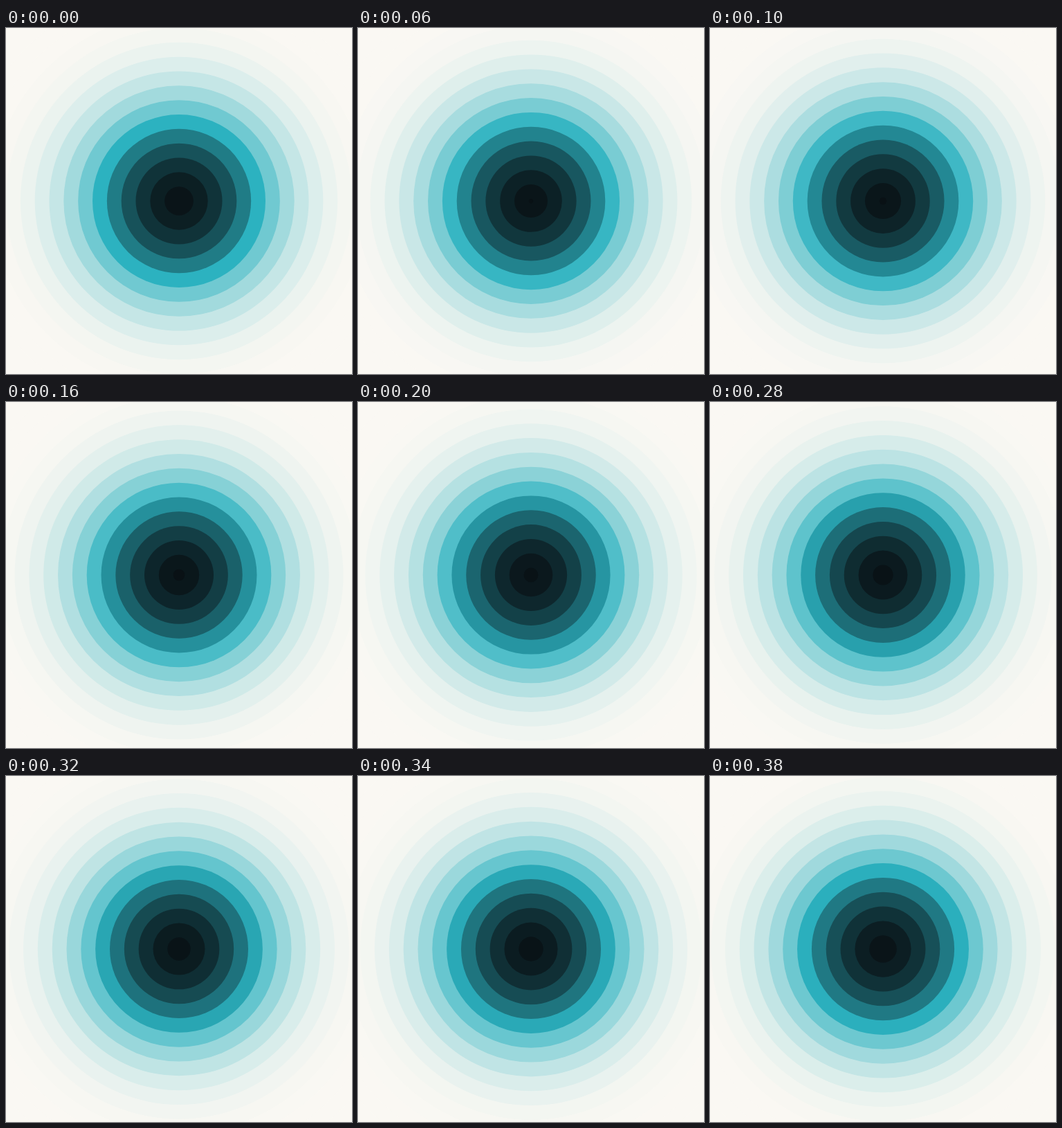
Recreate the animation shown at these times as an HTML page with a canvas. Size 500 by 500 pixels, loop 400 ms.

```html
<!DOCTYPE html>
<html lang="en">
<head>
<meta charset="utf-8">
<title>Expanding rings</title>
<style>
  html, body { margin: 0; height: 100%; overflow: hidden; background: #faf8f3; }
  canvas { display: block; }
</style>
</head>
<body>
<canvas id="stage" width="500" height="500"></canvas>
<script>
const ctx = document.getElementById('stage').getContext('2d');
const LOOP = 400, STEP = 20, CENTER = 250, SPACING = 250 / 12;
const RINGS = 16, TEAL_RING = 6;
const DARK = [9, 17, 21], TEAL = [44, 178, 192], PAPER = [250, 248, 243];

function mix(a, b, t) {
  return `rgb(${a.map((v, i) => Math.round(v + (b[i] - v) * t)).join()})`;
}

// Dark centre eases into teal, then teal fades out into the paper.
function ringColor(level) {
  return level < TEAL_RING
    ? mix(DARK, TEAL, (level / TEAL_RING) ** 2.25)
    : mix(PAPER, TEAL, ((RINGS - level) / (RINGS - TEAL_RING)) ** 3.8);
}

function draw(progress) {
  ctx.fillStyle = mix(PAPER, PAPER, 0);
  ctx.fillRect(0, 0, 500, 500);
  for (let i = RINGS - 1; i >= 0; i--) {
    const level = i + progress;
    ctx.fillStyle = ringColor(level);
    ctx.beginPath();
    ctx.arc(CENTER, CENTER, level * SPACING, 0, Math.PI * 2);
    ctx.fill();
  }
}

const start = performance.now();
function tick() {
  const time = (performance.now() - start) % LOOP;
  draw(Math.floor(time / STEP + 0.01) * STEP / LOOP);
  requestAnimationFrame(tick);
}
tick();
</script>
</body>
</html>
```
